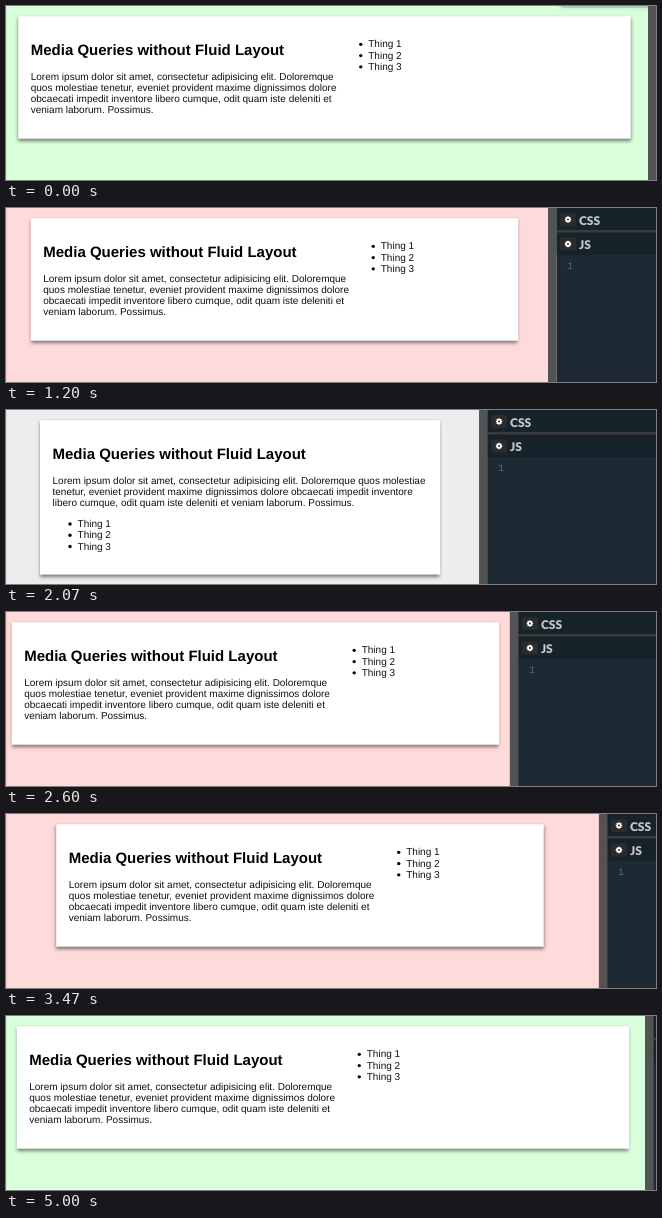
Recreate the animation shown at these times as an HTML page with a canvas. Size 650 by 174 pixels, loop 5070 ms.

```html
<!DOCTYPE html>
<html lang="en">
<head>
<meta charset="utf-8">
<title>Media Queries without Fluid Layout</title>
<style>
  html, body { margin: 0; width: 650px; height: 174px; overflow: hidden; background: #1d2a33; }
  canvas { display: block; }
</style>
</head>
<body>
<canvas id="stage" width="650" height="174"></canvas>
<script>
const ctx = document.getElementById('stage').getContext('2d');
const W = 650, H = 174, LOOP = 5070, RATE = 15, STEPS = 76;
const ZOOM = 0.625;
const SANS = '"Liberation Sans", Arial, sans-serif';

// Left edge of the dragged divider: [ms, x]
const DRAG = [
  [0, 642], [200, 638], [530, 625], [670, 617], [1070, 563], [1200, 542],
  [1600, 496], [2070, 473], [2190, 472], [2670, 511], [3000, 549],
  [3200, 570], [3730, 614], [3870, 625], [4270, 639], [5070, 639]
];

const WIDE_TEXT = [
  'Lorem ipsum dolor sit amet, consectetur adipisicing elit. Doloremque',
  'quos molestiae tenetur, eveniet provident maxime dignissimos dolore',
  'obcaecati impedit inventore libero cumque, odit quam iste deleniti et',
  'veniam laborum. Possimus.'
];
const NARROW_TEXT = [
  'Lorem ipsum dolor sit amet, consectetur adipisicing elit. Doloremque quos molestiae',
  'tenetur, eveniet provident maxime dignissimos dolore obcaecati impedit inventore',
  'libero cumque, odit quam iste deleniti et veniam laborum. Possimus.'
];

const LAYOUTS = [
  { min: 980, width: 980, bg: '#daffdb', columns: true },
  { min: 780, width: 780, bg: '#ffdadb', columns: true },
  { min: 0, width: 640, bg: '#ededed', columns: false }
];

function slope(i) {
  const a = DRAG[i - 1], b = DRAG[i], c = DRAG[i + 1];
  if (!a || !c) return 0;
  const before = (b[1] - a[1]) / (b[0] - a[0]);
  const after = (c[1] - b[1]) / (c[0] - b[0]);
  return before * after <= 0 ? 0 : 2 * before * after / (before + after);
}

function dividerAt(t) {
  let i = 0;
  while (i < DRAG.length - 2 && t >= DRAG[i + 1][0]) i++;
  const [t0, x0] = DRAG[i], [t1, x1] = DRAG[i + 1];
  const d = t1 - t0, u = (t - t0) / d, v = 1 - u;
  return v * v * (1 + 2 * u) * x0 + u * u * (3 - 2 * u) * x1
    + d * u * v * (v * slope(i) - u * slope(i + 1));
}

function rect(x, y, w, h, color) {
  ctx.fillStyle = color;
  ctx.fillRect(x, y, w, h);
}

function text(str, x, y, font, color) {
  ctx.font = font;
  ctx.fillStyle = color;
  ctx.fillText(str, x, y);
}

function dot(x, y, r, color) {
  ctx.fillStyle = color;
  ctx.beginPath();
  ctx.arc(x, y, r, 0, Math.PI * 2);
  ctx.fill();
}

function drawCard(left, layout) {
  const lines = layout.columns ? WIDE_TEXT : NARROW_TEXT;
  const listTop = layout.columns ? 50 : 171;
  ctx.save();
  ctx.translate(left, 10.2);
  ctx.scale(ZOOM, ZOOM);

  ctx.save();
  ctx.shadowColor = 'rgba(0,0,0,.5)';
  ctx.shadowOffsetY = 2;
  ctx.shadowBlur = 3.5;
  rect(0, 0, layout.width, layout.columns ? 196 : 247, '#fff');
  ctx.restore();

  text('Media Queries without Fluid Layout', 20, 62, `bold 24px ${SANS}`, '#000');
  lines.forEach((line, i) => text(line, 20, 101.5 + i * 18, `16px ${SANS}`, '#111'));

  const x = layout.columns ? 560 : 60;
  for (let i = 0; i < 3; i++) {
    const y = listTop + i * 18;
    dot(x - 12, y - 5, 2.7, '#000');
    text('Thing ' + (i + 1), x, y, `16px ${SANS}`, '#111');
  }
  ctx.restore();
}

// Soft bubble sliding out of view at the top edge
function drawBubble(alpha) {
  if (alpha <= 0) return;
  ctx.save();
  ctx.globalAlpha = alpha;
  ctx.shadowColor = 'rgba(0,0,0,.35)';
  ctx.shadowBlur = 6;
  ctx.fillStyle = 'rgba(120,140,120,.35)';
  ctx.beginPath();
  ctx.roundRect(552, -20, 120, 22, 6);
  ctx.fill();
  ctx.restore();
}

function drawPage(edge, t) {
  const view = edge - 5;
  const layout = LAYOUTS.find(l => view / ZOOM >= l.min);
  ctx.save();
  ctx.beginPath();
  ctx.rect(0, 0, edge, H);
  ctx.clip();
  rect(0, 0, edge, H, layout.bg);
  rect(0, 0, 1, H, 'rgba(0,0,0,.07)');
  drawCard(view / 2 - layout.width * ZOOM / 2, layout);
  drawBubble(1 - t / 200);
  ctx.restore();
}

function drawGear(x, y) {
  ctx.fillStyle = '#2d2b2c';
  ctx.beginPath();
  ctx.roundRect(x - 8, y - 6.5, 16, 13, 2);
  ctx.fill();
  ctx.save();
  ctx.translate(x, y);
  for (let i = 0; i < 4; i++) {
    rect(-0.8, -3.2, 1.6, 6.4, '#fff');
    ctx.rotate(Math.PI / 4);
  }
  ctx.restore();
  dot(x, y, 2.4, '#fff');
  dot(x, y, 1, '#2d2b2c');
}

function drawEditor(edge) {
  const x = edge + 8.5;
  rect(x, 0, W, H, '#1d2a33');
  ['CSS', 'JS'].forEach((label, i) => {
    const y = i * 24.5;
    rect(x, y, W, 22.5, '#17232b');
    drawGear(edge + 20, y + 11.5);
    text(label, edge + 31, y + 16.5, '900 12px Lato, sans-serif', '#c4c7ca');
  });
  rect(x, 22, W, 2.5, '#393b3d');
  text('1', edge + 19, 61, '10px "Liberation Mono", monospace', '#5b6a73');
  rect(edge, 0, 8.5, H, '#535353');
}

function frame(now) {
  const step = Math.min(STEPS - 1, Math.floor((now % LOOP) * RATE / 1000));
  const t = step * 1000 / RATE;
  const edge = dividerAt(t);
  ctx.textRendering = 'geometricPrecision';
  drawPage(edge, t);
  drawEditor(edge);
  requestAnimationFrame(frame);
}

frame(0);
</script>
</body>
</html>
```
